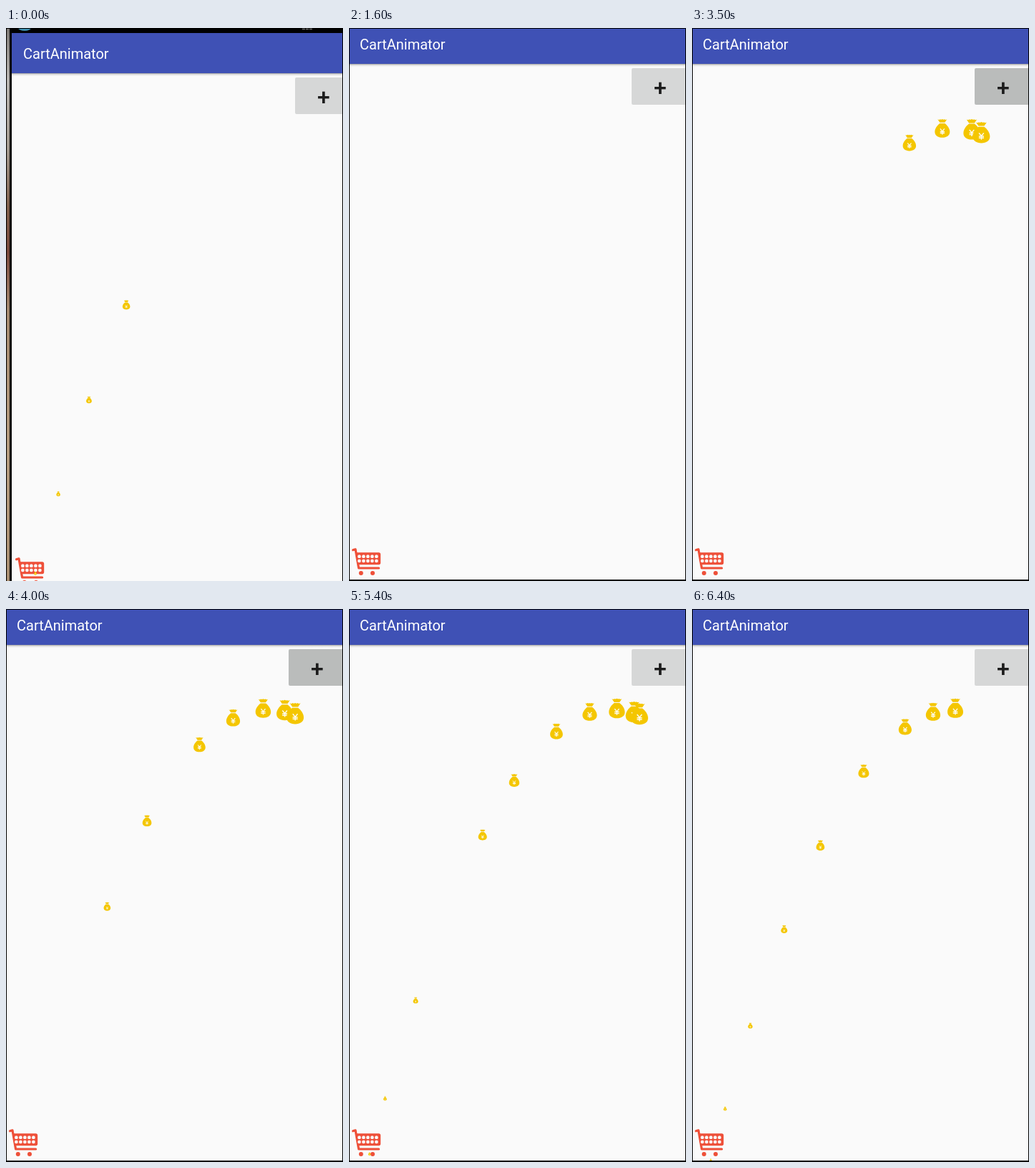
An HTML page for the animation above (6.5 s loop, 471 by 771 pixels).

```html
<!DOCTYPE html>
<html lang="en">
<head>
<meta charset="utf-8">
<title>CartAnimator</title>
<style>
html, body { margin: 0; width: 100%; height: 100%; overflow: hidden; background: #000; }
svg { display: block; width: 100vw; height: 100vh; }
text { font-family: Roboto, "Noto Sans", sans-serif; }
</style>
</head>
<body>
<svg viewBox="0 0 471 771">
  <defs>
    <linearGradient id="shade" x2="0" y2="1">
      <stop offset="0" stop-color="#000" stop-opacity=".38"/>
      <stop offset=".4" stop-color="#000" stop-opacity=".12"/>
      <stop offset="1" stop-color="#000" stop-opacity="0"/>
    </linearGradient>
    <linearGradient id="wall" x2="0" y2="1">
      <stop offset="0" stop-color="#77736f"/>
      <stop offset=".1" stop-color="#b9b6b2"/>
      <stop offset=".22" stop-color="#a39a90"/>
      <stop offset=".32" stop-color="#80604d"/>
      <stop offset=".4" stop-color="#7a4a3c"/>
      <stop offset=".5" stop-color="#a58a70"/>
      <stop offset=".75" stop-color="#b59c80"/>
      <stop offset="1" stop-color="#a88d70"/>
    </linearGradient>
    <g id="bag">
      <path fill="#f4c600" d="M-7.5-15Q-5-13.5-3.6-15.2Q-1.8-14 0-15.4Q1.8-14 3.6-15.2Q5-13.5 7.5-15L4-9.8H-4Z
        M-4-8.6H4C8-5.6 12-.5 12 5C12 11 7 14.2 0 14.2S-12 11-12 5C-12-.5-8-5.6-4-8.6Z"/>
      <path fill="none" stroke="#fdfbef" stroke-width="1.5" d="M-3.4 0L0 4.2L3.4 0M0 4.2V9.4M-3.6 4.7H3.6M-3.6 7H3.6"/>
    </g>
  </defs>

  <g id="screen">
    <rect x="-8" y="-20" width="5" height="800" fill="url(#wall)"/>
    <rect x="-4" y="-20" width="490" height="800"/>
    <ellipse cx="17" cy="-13" rx="9" ry="4" fill="#3d8fae"/>
    <path d="M405-12H419" stroke="#bbb" stroke-width="1.4" stroke-dasharray="4 1"/>
    <rect x="-1" y="-6" width="480" height="775" fill="#fafafa"/>
    <rect x="-1" y="50" width="480" height="4" fill="url(#shade)"/>
    <rect x="-1" y="-6" width="480" height="56" fill="#3f51b5"/>
    <text x="15" y="30" font-size="20" fill="#fff">CartAnimator</text>

    <rect id="button" x="395" y="56" width="80" height="51" rx="2"/>
    <text x="435" y="93.8" font-size="32" font-weight="500" text-anchor="middle" fill="#1c1c1c">+</text>

    <g id="cart" fill="#ee5039">
      <path fill="none" stroke="#ee5039" stroke-width="3.2" stroke-linecap="round" stroke-linejoin="round"
        d="M5.6 727.8L9 726.8L13.6 753H41.6"/>
      <path d="M9.5 731.2H41.5Q44.2 731.2 44.2 734V745.5Q44.2 748.2 41.5 748.2H12.5Z"/>
      <circle cx="16.8" cy="760" r="3"/>
      <circle cx="33" cy="760" r="3"/>
    </g>
    <g id="bags"></g>
    <rect x="-4" y="769" width="490" height="12"/>
  </g>
  <path d="M.5 771V.5H470.5V771" fill="none" stroke="#000"/>
</svg>
<script>
const LOOP = 6500, STEP = 100, FLIGHT = 1800, SPAN = 385;
const earlier = [-1605, -1409, -1236, -1064];
const taps = [2880, 3051, 3272, 3427, 3593, 3762, 3921, 4113, 4420, 4552,
  4734, 4897, 5067, 5239, 5398, 5579, 5760, 5899, 6034];

const $ = id => document.getElementById(id);
const add = (parent, name, attrs) => {
  const el = document.createElementNS("http://www.w3.org/2000/svg", name);
  for (const key in attrs) el.setAttribute(key, attrs[key]);
  return parent.appendChild(el);
};

for (const y of [736.8, 743])
  for (let i = 0; i < 5; i++)
    add($("cart"), "rect", { x: 12.2 + i * 6, y: y - 2.2, width: 4.4, height: 4.4, rx: 1.6, fill: "#fafafa" });

const bags = [...earlier, ...taps].map(start => ({ start, el: add($("bags"), "use", { href: "#bag" }) }));

function placeBag({ start, el }, t) {
  const p = (t - start) / FLIGHT;
  const flying = p >= 0 && p < 1;
  el.style.display = flying ? "" : "none";
  if (!flying) return;
  const ease = (1 - Math.cos(Math.PI * p)) / 2;
  const u = SPAN * ease;
  const x = 406 - u;
  const y = 147 - 0.4216 * u + 0.005421 * u * u;
  el.setAttribute("transform", `translate(${x} ${y}) scale(${1 - 0.87 * ease})`);
}

function draw(t) {
  const slide = t < 1400 ? 1 : Math.max(0, (1600 - t) / 300);
  $("screen").setAttribute("transform", `translate(${Math.round(9 * slide)} ${Math.round(13 * slide)})`);
  const pressed = taps.some((tap, i) => i > 0 && t >= tap - 120 && t < tap - 18);
  $("button").setAttribute("fill", pressed ? "#babcbb" : "#d6d7d7");
  bags.forEach(bag => placeBag(bag, t));
}

const origin = performance.now();
function tick() {
  const t = (performance.now() - origin) % LOOP;
  draw(Math.floor(t / STEP) * STEP);
  requestAnimationFrame(tick);
}
tick();
</script>
</body>
</html>
```
